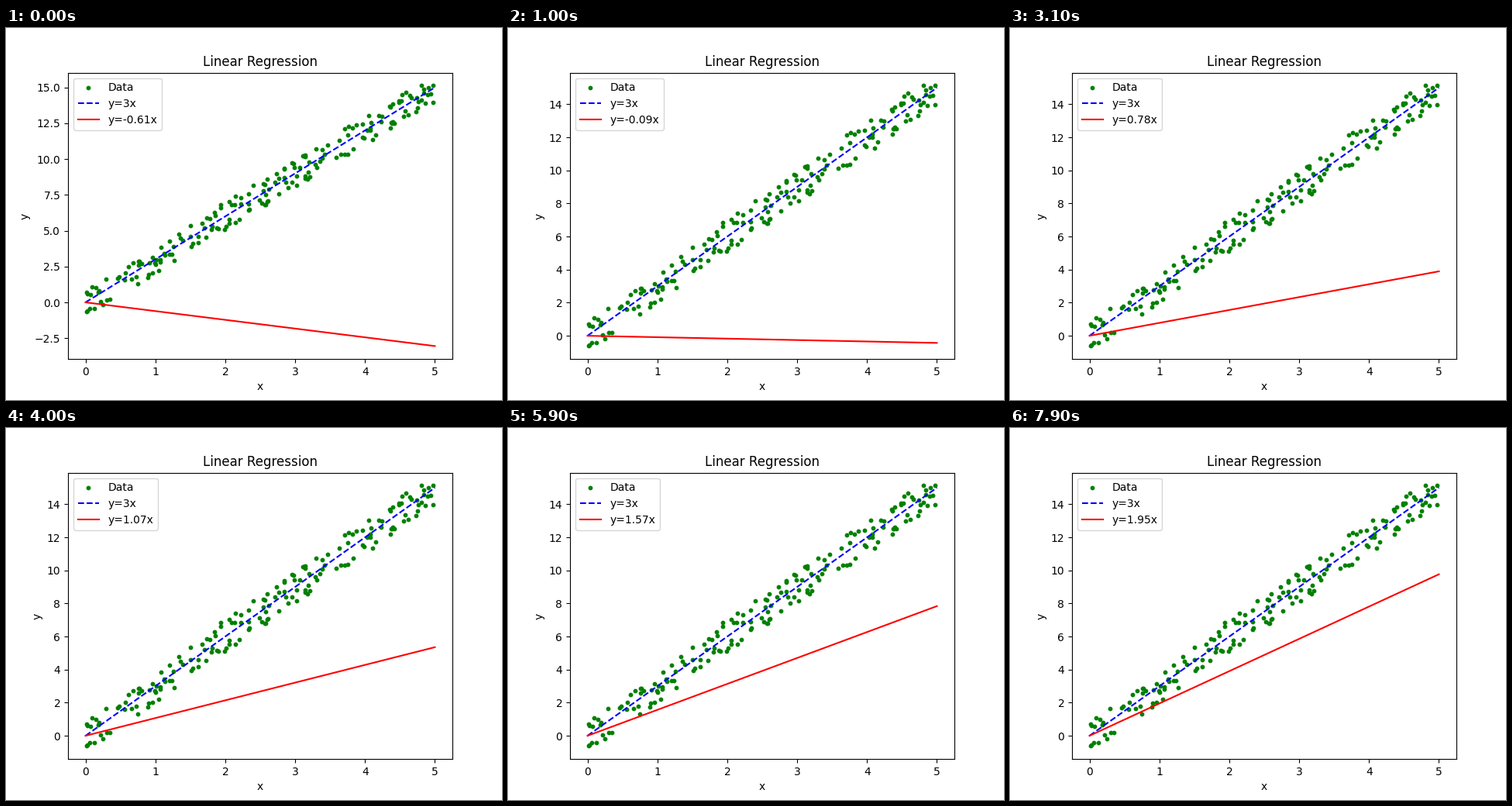
Recreate the animation shown at these times as a matplotlib script. Size 640 by 480 pixels, loop 8000 ms.

```python
import numpy as np
import matplotlib.pyplot as plt
from matplotlib.animation import FuncAnimation

FRAMES, INTERVAL = 80, 100
TRUE_W, START_W, DECAY = 3.0, -0.61, 0.98445
DOTS, NOISE = 180, 1.0

# Lowest and highest dot, then a few that stand out from the band.
LOW, HIGH = (0.016, -0.622), (4.97, 15.124)
OUTLIERS = [(0.09, 1.08), (1.05, 2.2), (1.94, 6.84), (2.84, 9.28),
            (3.75, 10.35), (4.53, 14.47), (4.81, 15.12)]


def make_data(seed=7):
    rng = np.random.default_rng(seed)
    x = rng.uniform(0, 5, DOTS)
    trend = TRUE_W * x
    # Noise never takes a dot past the lowest or highest one.
    y = rng.uniform(np.maximum(trend - NOISE, LOW[1]),
                    np.minimum(trend + NOISE, HIGH[1]))
    kx, ky = np.transpose([LOW, HIGH, *OUTLIERS])
    return np.append(x, kx), np.append(y, ky)


x, y = make_data()
line_x = np.linspace(0, 5, 100)
fig, ax = plt.subplots(figsize=(6.4, 4.8), dpi=100)


def update(i):
    # Gradient descent closes a fixed share of the gap at each step.
    w = TRUE_W - (TRUE_W - START_W) * DECAY ** i
    ax.clear()
    ax.scatter(x, y, s=10, color="green", label="Data")
    ax.plot(line_x, TRUE_W * line_x, "b--", label="y=3x")
    ax.plot(line_x, w * line_x, "r-", label=f"y={w:.2f}x")
    ax.set_title("Linear Regression")
    ax.set_xlabel("x")
    ax.set_ylabel("y")
    ax.legend(loc="upper left")


anim = FuncAnimation(fig, update, frames=FRAMES, interval=INTERVAL,
                     init_func=lambda: None, repeat=True, repeat_delay=0)
plt.show()
```
